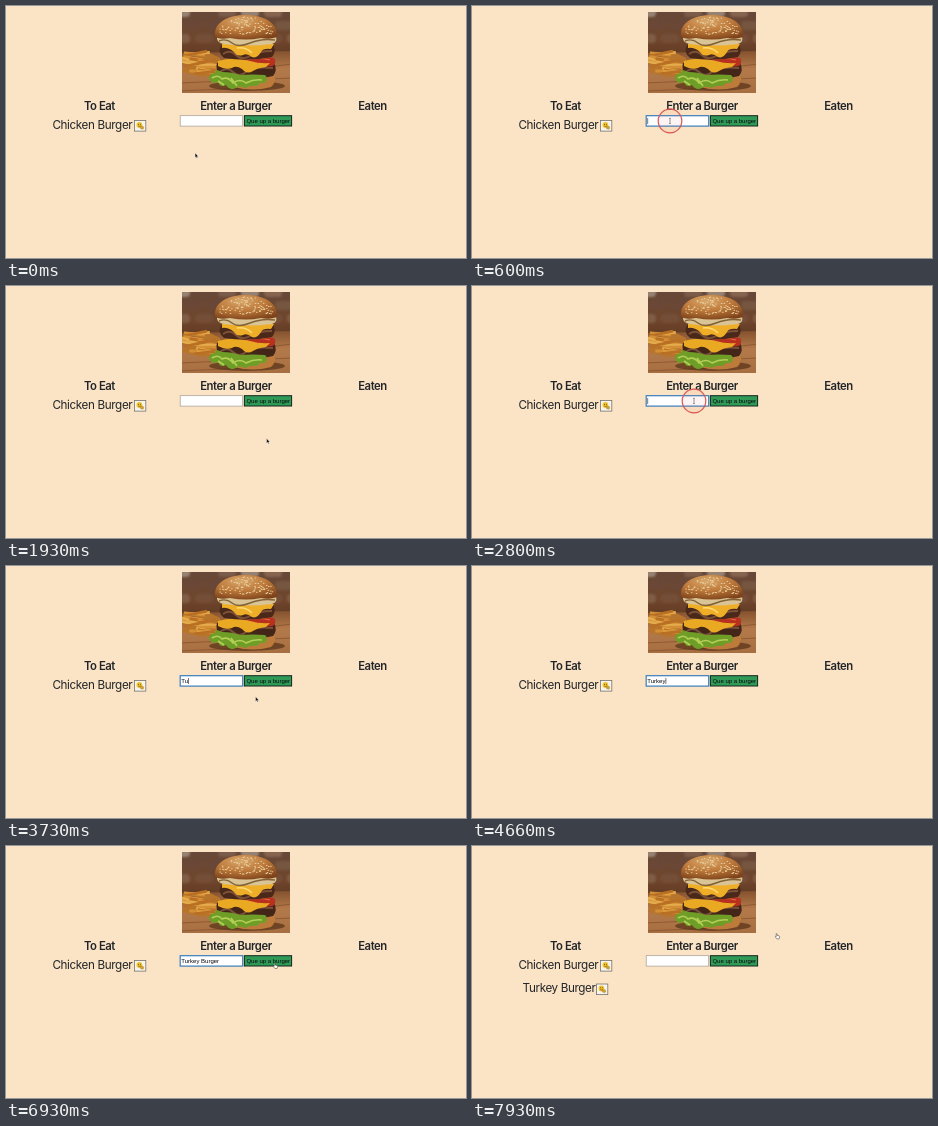
An HTML page for the animation above (8000 ms loop, 460 by 252 pixels).

```html
<!DOCTYPE html>
<html lang="en">
<head>
<meta charset="utf-8">
<title>Burger queue</title>
<style>
  html, body { margin: 0; width: 100%; height: 100%; overflow: hidden; background: #fbe3c5; }
  svg { display: block; width: 100%; height: 100%; }
  text { fill: #212529; white-space: pre; }
  .head { font: 600 11.3px Inter, sans-serif; letter-spacing: -.45px; text-anchor: middle; }
  .item { font: 400 11.7px Inter, sans-serif; letter-spacing: -.38px; }
  .form { font: 6px "Liberation Sans", Arial, sans-serif; fill: #080808; }
</style>
</head>
<body>
<svg viewBox="0 0 460 252">
  <defs>
    <clipPath id="frame"><rect x="176" y="6" width="108" height="81"/></clipPath>
    <filter id="soft" x="-5%" y="-5%" width="110%" height="110%"><feGaussianBlur stdDeviation=".5"/></filter>
    <filter id="blur" x="-20%" y="-20%" width="140%" height="140%"><feGaussianBlur stdDeviation="1.2"/></filter>
    <linearGradient id="wall" x1="0" y1="0" x2="0" y2="1">
      <stop offset="0" stop-color="#66483a"/><stop offset=".35" stop-color="#70462c"/><stop offset=".6" stop-color="#5c3620"/>
    </linearGradient>
    <linearGradient id="wood" x1="0" y1="0" x2="0" y2="1">
      <stop offset="0" stop-color="#85522f"/><stop offset=".4" stop-color="#b3794a"/><stop offset="1" stop-color="#a56d40"/>
    </linearGradient>
    <radialGradient id="bun" cx=".42" cy=".25" r=".8">
      <stop offset="0" stop-color="#d9a86c"/><stop offset=".5" stop-color="#bd793a"/><stop offset="1" stop-color="#7d421a"/>
    </radialGradient>
    <g id="icon">
      <rect x=".5" y=".5" width="11.3" height="10.6" fill="#f7f4ee" stroke="#77736d" stroke-width=".8"/>
      <circle cx="5.4" cy="4.9" r="2.9" fill="#efc32c"/>
      <circle cx="4.5" cy="4.2" r=".5" fill="#5d431b"/>
      <circle cx="6.3" cy="4.2" r=".5" fill="#5d431b"/>
      <path d="M4 6q1.5 1.2 3-.1" fill="none" stroke="#82521b" stroke-width=".6"/>
      <path d="M6.2 6.2l3 .1.7 1.9-1.3 1.1-2.3-.9z" fill="#d7a526" stroke="#8a6523" stroke-width=".3"/>
    </g>
  </defs>
  <rect width="460" height="252" fill="#fbe3c5"/>

  <g clip-path="url(#frame)">
    <g filter="url(#soft)">
      <rect x="174" y="4" width="112" height="85" fill="url(#wall)"/>
      <g id="bricks" filter="url(#blur)"></g>
      <path d="M174 47L286 45V90H174Z" fill="url(#wood)"/>
      <path d="M174 77L286 72M174 85L240 82M262 61L286 58" stroke="#784726" stroke-width=".8" opacity=".7"/>
      <ellipse cx="241" cy="80" rx="38" ry="5" fill="#492712" opacity=".6"/>
      <path d="M176 66L182 54 200 45 214 52 216 68 196 71Z" fill="#b7742b"/>
      <g id="fries" stroke-linecap="square"></g>
      <path d="M223 70Q245 78 269 69Q270 77 265 81Q246 86 228 81Z" fill="#bd7b3b"/>
      <path d="M211 57Q239 52 268 57Q272 64 267 70Q240 77 214 70Q209 63 211 57Z" fill="#442619"/>
      <path d="M214 66Q221 60 227 66T240 66T267 62" fill="none" stroke="#7c5139" stroke-width="2"/>
      <path d="M203 73Q203 67 209 67Q209 62 216 66Q226 66 234 69Q246 68 259 69Q263 72 259 77Q254 76 251 80Q244 79 239 82Q234 79 230 82Q224 85 220 79Q214 82 212 76Q206 79 203 73Z" fill="#6f9e28"/>
      <path d="M206 72Q212 68 216 73Q222 70 227 77Q234 72 240 77Q248 73 256 74M212 75L218 79M225 72L231 80" fill="none" stroke="#b3cf55" stroke-width="1.6"/>
      <path d="M226 53Q250 48 268 52Q271 56 267 60Q248 62 229 59Z" fill="#b9301f"/>
      <path d="M240 54Q253 51 264 54" fill="none" stroke="#df704b" stroke-width="1.2"/>
      <path d="M212 55Q228 50 244 55Q254 58 264 57L260 61Q251 62 247 65Q241 69 236 63Q230 59 226 62Q219 64 212 60Z" fill="#eaa923"/>
      <path d="M215 39Q240 34 267 39Q271 45 266 51Q242 56 218 52Q211 46 215 39Z" fill="#4a291a"/>
      <path d="M217 48Q224 43 230 49T244 50T266 45" fill="none" stroke="#7d5038" stroke-width="2"/>
      <path d="M216 38Q240 33 268 38L265 43Q257 42 255 46Q251 53 246 51Q241 47 237 49Q231 51 228 46Q222 41 216 42Z" fill="#efae27"/>
      <path d="M231 42Q240 41 246 47" fill="none" stroke="#ffda70" stroke-width="1.5"/>
      <path d="M211 31Q241 27 270 31Q272 36 266 38Q242 41 217 38Q210 36 211 31Z" fill="#d8c496"/>
      <path d="M213 35Q220 32 226 37T244 37T269 34" fill="none" stroke="#836238" stroke-width="1.4"/>
      <path d="M209 30C208 16 222 9 240 9C260 9 273 19 271 31Q264 34 255 32Q240 35 224 32Q212 34 209 30Z" fill="url(#bun)"/>
      <g id="seeds" fill="#ecd3a5"></g>
    </g>
  </g>

  <text class="head" x="93.4" y="104">To Eat</text>
  <text class="head" x="230" y="104">Enter a Burger</text>
  <text class="head" x="366.5" y="104">Eaten</text>

  <text class="item" x="46.4" y="122.9">Chicken Burger</text>
  <use href="#icon" x="128" y="114"/>
  <g id="added">
    <text class="item" x="50.6" y="146.4">Turkey Burger</text>
    <use href="#icon" x="124" y="137.5"/>
  </g>

  <rect id="field" x="174.2" y="109.7" width="62.5" height="10.4" fill="#fff"/>
  <text id="typed" class="form" x="175.3" y="117.1"></text>
  <rect id="caret" y="112" width=".6" height="6" fill="#222"/>
  <rect x="238.4" y="109.7" width="47.2" height="10.3" fill="#2f9a57" stroke="#14251a" stroke-width="1"/>
  <text class="form" x="240.4" y="117.1">Que up a burger</text>

  <circle id="ring" r="11.8" fill="#e0605a" fill-opacity=".07" stroke="#d9534f" stroke-width="1.2"/>
  <g id="pointer">
    <path id="arrow" d="M0 0V4.6L1.1 3.7 1.8 5.2 2.6 4.8 1.9 3.4H3.3Z" fill="#111" stroke="#fff" stroke-width=".35"/>
    <path id="beam" d="M-.9-2.7Q0-2.7 0-2Q0-2.7 .9-2.7M0-2V2M-.9 2.7Q0 2.7 0 2Q0 2.7 .9 2.7" fill="none" stroke="#555" stroke-width=".6"/>
    <path id="hand" d="M.6.3Q1.2-.2 1.5.5V2L3.6 2.5Q4.2 2.8 4 3.7L3.5 5.5H1.3L-.4 3.5Q-.2 2.8 .6 3.3Z" fill="#fff" stroke="#333" stroke-width=".5"/>
  </g>
</svg>
<script>
const LOOP = 8000;
const $ = id => document.getElementById(id);
const set = (el, attrs) => { for (const k in attrs) el.setAttribute(k, attrs[k]); };
const show = (el, on) => el.setAttribute('visibility', on ? 'visible' : 'hidden');
const add = (parent, tag, attrs) => {
  const el = document.createElementNS('http://www.w3.org/2000/svg', tag);
  set(el, attrs);
  parent.appendChild(el);
};

let seed = 11;
const rand = () => (seed = seed * 16807 % 2147483647) / 2147483647;

function drawPhoto() {
  const tones = ['#a3907f', '#80604d', '#69483a', '#b09d8c', '#8f6c55'];
  for (let row = 0; row < 3; row++)
    for (let col = 0; col < 6; col++)
      add($('bricks'), 'rect', {
        x: 166 + col * 23 + row % 2 * 11, y: 2 + row * 13, width: 18, height: 9, rx: 4,
        fill: tones[Math.floor(rand() * 5)], opacity: .8 - row * .25
      });
  for (let i = 0; i < 18; i++) {
    const x = 175 + rand() * 19, y = 47 + i * 1.2;
    add($('fries'), 'line', {
      x1: x, y1: y, x2: x + 14 + rand() * 6, y2: y + rand() * 10 - 4,
      stroke: ['#d48f34', '#e5ac4b', '#b96f24'][i % 3], 'stroke-width': 2.8
    });
  }
  for (let i = 0; i < 100; i++) {
    const a = Math.PI * (1 + rand()), r = Math.sqrt(rand());
    add($('seeds'), 'ellipse', {
      cx: 240.5 + 28 * r * Math.cos(a), cy: 28 + 17 * r * Math.sin(a), rx: .85, ry: .5
    });
  }
}

// time, x, y of the pointer tip
const path = [
  [60, 189.1, 147], [460, 198, 115], [900, 198, 115], [1600, 259, 156],
  [1800, 259, 156], [1920, 260.6, 152.6], [2080, 260.6, 152.6], [2600, 222, 115],
  [2850, 222, 115], [3240, 249.6, 130.8], [6330, 249.6, 130.8], [6860, 267.6, 117],
  [7380, 267.6, 117], [7860, 303.6, 87.4]
];
const clicks = [[520, 760], [1660, 1840], [2660, 2830], [7190, 7380]];
const keys = [3440, 3640, 4060, 4250, 4440, 4640, 4850, 5050, 5220, 5390, 5620, 5800, 6000];
const phrase = 'Turkey Burger';
const SUBMIT = 7440;

const within = (t, a, b) => t >= a && t < b;

function pointerAt(t) {
  const i = path.findIndex(p => p[0] > t);
  if (i === 0) return path[0].slice(1);
  if (i < 0) return path[path.length - 1].slice(1);
  const [t0, x0, y0] = path[i - 1], [t1, x1, y1] = path[i];
  const u = (t - t0) / (t1 - t0), e = u * u * (3 - 2 * u);
  return [x0 + (x1 - x0) * e, y0 + (y1 - y0) * e];
}

function render(t) {
  const [x, y] = pointerAt(t);
  const inRow = within(y, 109, 121);
  const shape = t >= SUBMIT || inRow && within(x, 238, 286) ? 'hand'
    : inRow && within(x, 174, 237) ? 'beam' : 'arrow';
  const visible = !within(t, 4650, 6330);
  for (const s of ['arrow', 'beam', 'hand']) show($(s), visible && s === shape);
  set($('pointer'), { transform: `translate(${x} ${y})` });

  set($('ring'), { cx: x, cy: y });
  show($('ring'), clicks.some(([a, b]) => within(t, a, b)));

  const focused = within(t, 540, 1690) || within(t, 2680, SUBMIT);
  set($('field'), { stroke: focused ? '#3b7dbd' : '#a09b93', 'stroke-width': focused ? 1.2 : .7 });

  const count = t < SUBMIT ? keys.filter(k => k <= t).length : 0;
  $('typed').textContent = phrase.slice(0, count);
  const last = count ? keys[count - 1] : t < 2680 ? 540 : 2680;
  set($('caret'), { x: 175.5 + (count ? $('typed').getComputedTextLength() : 0) });
  show($('caret'), focused && (t - last) % 1000 < 500);

  show($('added'), t >= SUBMIT);
}

drawPhoto();
const start = performance.now();
function tick() {
  render((performance.now() - start) % LOOP);
  requestAnimationFrame(tick);
}
tick();
</script>
</body>
</html>
```
